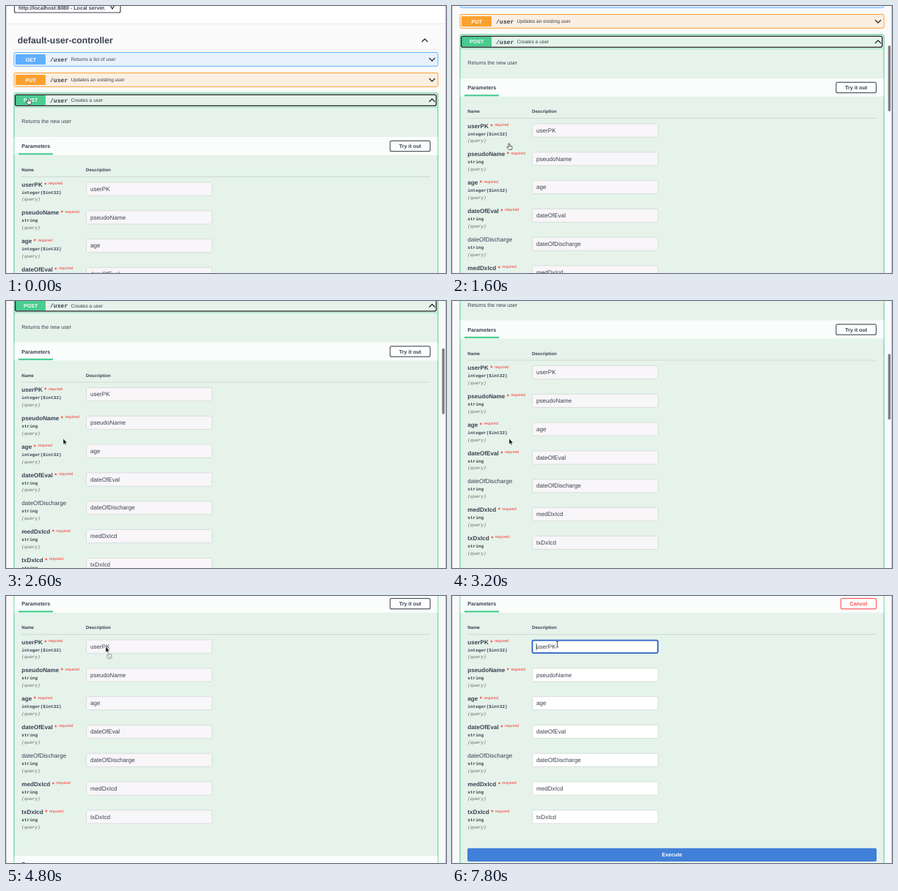
Recreate the animation shown at these times as an HTML page. Size 600x365 px, loop 8 s.

```html
<!DOCTYPE html>
<html lang="en">
<head>
<meta charset="utf-8">
<title>API form</title>
<style>
  html, body { margin: 0; width: 100%; height: 100%; overflow: hidden; background: #fafafa; }
  svg { display: block; width: 100%; height: 100%; }
  text { font-family: "Liberation Sans", Arial, sans-serif; fill: #3b4151; text-rendering: geometricPrecision; }
  .b { font-weight: bold; }
  .mono { font-family: "Liberation Mono", monospace; }
  .it { font-style: italic; fill: #666; }
  .mid { text-anchor: middle; }
  .white { fill: #fff; }
  .red { fill: #f33; }
</style>
</head>
<body>
<svg id="stage" viewBox="0 0 600 365"></svg>
<script>
const STEP = 200, LOOP = 8000;
const MINT = '#e5f3eb', GREEN = '#49cc90', DARK = '#3b4151';
const stage = document.getElementById('stage');

const text = (s, x, y, size, cls = '') =>
  `<text x="${x}" y="${y}" font-size="${size}" class="${cls}">${s}</text>`;
const rect = (x, y, w, h, fill, stroke = 'none', line = 1, r = 0, extra = '') =>
  `<rect x="${x}" y="${y}" width="${w}" height="${h}" rx="${r}" fill="${fill}" stroke="${stroke}" stroke-width="${line}" ${extra}/>`;
const path = (d, stroke, line = 1, fill = 'none') =>
  `<path d="${d}" fill="${fill}" stroke="${stroke}" stroke-width="${line}" stroke-linejoin="round"/>`;
const chevron = (x, y, up, w = 4) =>
  path(`M${x - w} ${y + (up ? 2 : -2)}L${x} ${y + (up ? -2 : 2)}L${x + w} ${y + (up ? 2 : -2)}`, '#222', 1.2);

function summary(method, about, y, color) {
  return rect(13, y - 7, 41, 14, color, 'none', 1, 1.5) +
    text(method, 33.7, y + 2.5, 7.1, 'b mid white') +
    text('/user', 60, y + 2.8, 8.1, 'b mono') +
    text(about, 88.5, y + 2.3, 6.65);
}

function button(id, label, x, w) {
  return `<g id="${id}">` + rect(x, 184.3, w, 14.4, '#fdfefd', '#555c66', 1.2, 2) +
    text(label, x + w / 2, 194.2, 7.2, 'b mid') + '</g>';
}

const fields = [
  ['userPK', 'integer($int32)'], ['pseudoName', 'string'], ['age', 'integer($int32)'],
  ['dateOfEval', 'string'], ['dateOfDischarge', 'string', true],
  ['medDxIcd', 'string'], ['txDxIcd', 'string']
];

function fieldRow([name, type, optional], i) {
  const y = 241 + i * 38.8;
  const label = optional ? name
    : `${name}<tspan class="red" font-size="8" dx="2.5">*</tspan>` +
      '<tspan class="red" font-size="5.3" font-weight="normal" dx="2.5" dy="-2.6">required</tspan>';
  return text(label, 21.3, y + 5.6, 8.15, optional ? '' : 'b') +
    text(type, 21.3, y + 15.6, 6.05, 'b mono') +
    text('(query)', 21.3, y + 25.4, 6.05, 'mono it') +
    rect(109.5, y, 171.5, 18.2, '#f8f6f8', '#d4d9d7', 0.8, 1.5, 'class="input"') +
    text(name, 115, y + 11.7, 8.1);
}

const page =
  rect(0, -20, 600, 44, '#fff') + path('M0 24.5H600', '#eaeaea') +
  rect(11.5, -10, 144.5, 19, '#fff', '#41444e', 1.2, 2) +
  text('http://localhost:8080 - Local server.', 17, 5, 7.1, 'b') + chevron(145, 2, false, 2.5) +
  text('default-user-controller', 15.7, 51.3, 12.2, 'b') + chevron(571, 47, true) +
  path('M10 59.5H590', '#e4e5e8', 0.8) +
  rect(11, 63.5, 578, 18.8, '#e9f2fc', '#61affe', 1, 2) +
  summary('GET', 'Returns a list of user', 73, '#61affe') + chevron(581, 73, false) +
  rect(11, 91.5, 578, 18.8, '#fbefe2', '#fca130', 1, 2) +
  summary('PUT', 'Updates an existing user', 101, '#fca130') + chevron(581, 101, false) +
  rect(11, 119, 578, 700, MINT, GREEN, 1, 2) +
  path('M11 138.5H589', '#8fdcb9', 0.9) +
  summary('POST', 'Creates a user', 128.8, GREEN) + chevron(581, 129, true) +
  rect(12.6, 121.3, 574, 15, 'none', '#222', 1.3, 2) +
  text('Returns the new user', 21.3, 160, 7.15) +
  rect(11.5, 179, 577, 24.8, '#fafdfb') +
  text('Parameters', 21.3, 194.2, 7.16, 'b') + rect(17, 201.2, 47, 2.2, GREEN) +
  button('tryIt', 'Try it out', 523.8, 54.6) + button('cancel', 'Cancel', 530.3, 48.2) +
  text('Name', 21.3, 226, 6.15, 'b') + text('Description', 109, 226, 6.15, 'b') +
  path('M21 233.5H578.5', '#c9d6d0', 0.8) +
  fields.map(fieldRow).join('') +
  '<g id="responses">' + rect(11.5, 536, 577, 25, '#fafdfb') + text('Responses', 21.3, 550.3, 7.16, 'b') + '</g>' +
  '<g id="execute">' + rect(21, 525.7, 558, 18.2, '#4180d8', 'none', 1, 2) +
  text('Execute', 300, 537.3, 7.2, 'b mid white') + '</g>' +
  '<g id="focus">' + rect(109.5, 241.6, 171.2, 17.2, 'none', '#2b62c4', 1.8, 1.5) +
  path('M115.2 246V255', '#222', 0.8) + '</g>';

// Each pointer is drawn around its hot spot.
const pointers =
  '<g id="hand">' + path('M-1 -3.8Q0 -4.6 .6 -3.6L1 -1L3.6 -.3Q4.4 0 4.2 1.2L3.4 4.4H-.4L-3.2 1Q-3 -.2 -1.8 .4L-.8 1.2Z', '#333', 0.8, '#fff') +
  path('M1 -.8V1M2.4 -.4V1', '#555', 0.5) + '</g>' +
  '<g id="arrow">' + path('M0 -4V4L1.7 2.4L3 5L4.2 4.4L3 1.9H5.3Z', '#fff', 0.5, '#111') + '</g>' +
  '<g id="blocked"><circle cx="5" cy="9.5" r="3.4" fill="#eee" stroke="#999" stroke-width="1"/>' +
  path('M2.8 7.3L7.2 11.7', '#999', 0.9) + '</g>' +
  '<g id="beam">' + path('M-1.7 -4Q0 -4 0 -3Q0 -4 1.7 -4M0 -3V3M-1.7 4Q0 4 0 3Q0 4 1.7 4', '#222', 0.8) + '</g>';

stage.innerHTML = rect(0, 0, 600, 365, '#fafafa') + `<g id="page">${page}</g>` +
  path('M.5 0V365', '#c4c4c4', 0.8) + path('M599.6 0V365', '#aaa', 0.8) +
  rect(594.6, 0, 3.5, 90, '#808080', 'none', 1, 1.7, 'id="bar"') + `<g id="pointer">${pointers}</g>`;

const el = id => document.getElementById(id);
const show = (id, on) => el(id).setAttribute('visibility', on ? 'visible' : 'hidden');
const move = (id, x, y) => el(id).setAttribute('transform', `translate(${x} ${y})`);

// Keys are [time, value, ...]; values are interpolated linearly.
function at(keys, t, k = 1) {
  const n = keys.findIndex(key => key[0] > t);
  if (n < 0) return keys[keys.length - 1][k];
  const a = keys[n - 1], b = keys[n];
  return a[k] + (b[k] - a[k]) * (t - a[0]) / (b[0] - a[0]);
}

const scrollKeys = [[0, 0], [600, 0], [1600, 80], [2600, 122.5], [3200, 152.5], [3600, 181]];
const pointerKeys = [
  [0, 30.5, 130], [200, 30.5, 130], [800, 78, 192], [4200, 78, 192], [4800, 136, 73],
  [5200, 136, 73], [5800, 550, 13], [6400, 550, 13], [6600, 460, 69.5], [7200, 143.5, 66]
];

function draw(t) {
  const scroll = at(scrollKeys, t);
  const editing = t >= 6400, focused = t >= 7600;
  const kind = t < 2000 ? 'hand' : t < 5800 ? 'arrow' : t < 7000 ? 'hand' : 'beam';

  move('page', 0, -scroll);
  el('bar').setAttribute('y', 54 + (scroll - 80) * 0.25);
  show('bar', t > 600 && t < 4200);

  show('tryIt', !editing);
  show('cancel', editing);
  show('execute', editing);
  show('responses', !editing);
  show('focus', focused);
  const red = t >= 6800;
  el('cancel').firstChild.setAttribute('stroke', red ? '#ff6060' : '#555c66');
  el('cancel').lastChild.style.fill = red ? '#ff5050' : DARK;
  document.querySelectorAll('.input').forEach(box => box.setAttribute('fill', editing ? '#fff' : '#f8f6f8'));

  move('pointer', at(pointerKeys, t), at(pointerKeys, t, 2));
  for (const id of ['hand', 'arrow', 'beam']) show(id, id === kind);
  show('blocked', t >= 4800 && t <= 5200);
}

function frame() {
  draw(Math.floor(performance.now() % LOOP / STEP) * STEP);
  requestAnimationFrame(frame);
}
frame();
</script>
</body>
</html>
```
